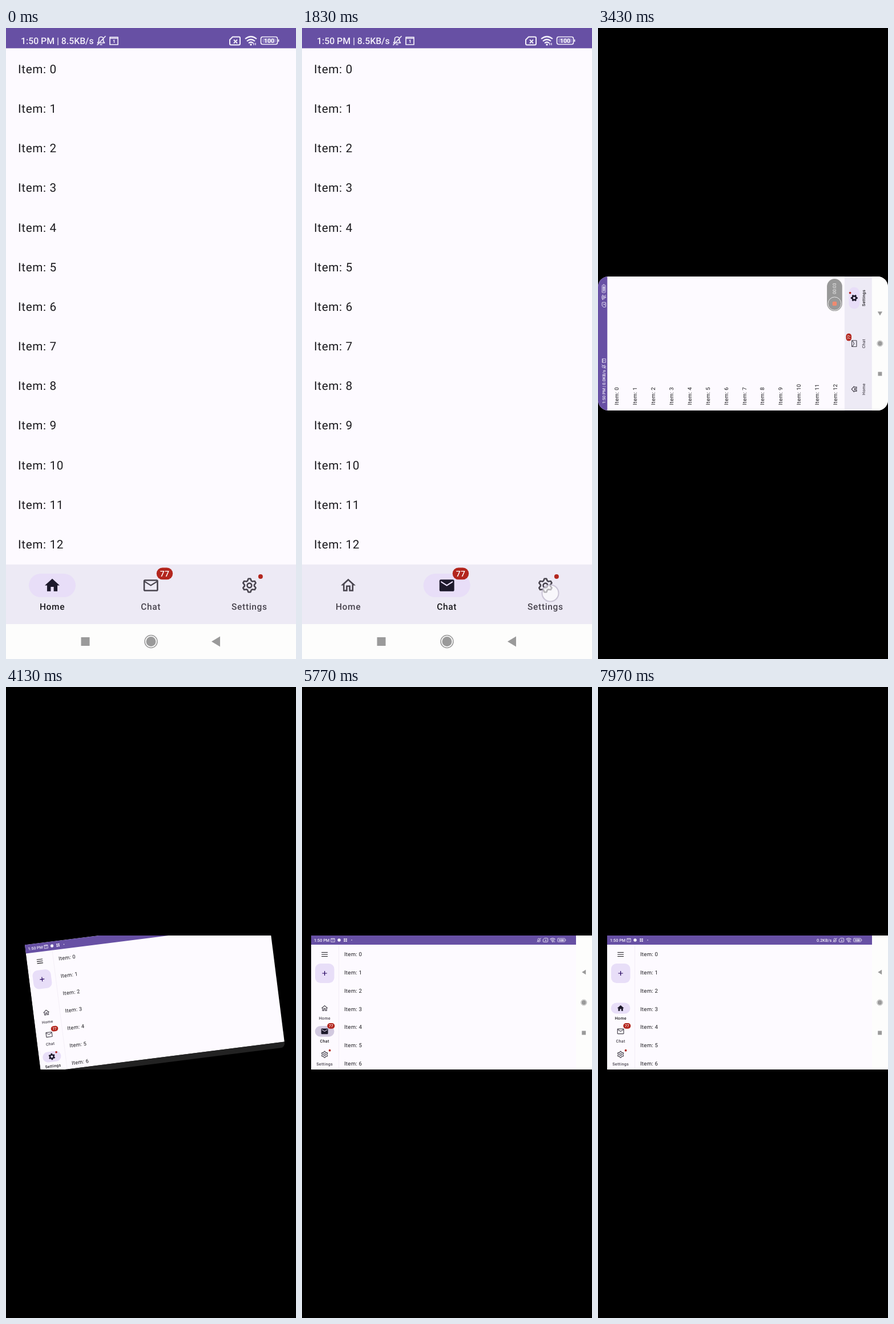
Write an HTML page that moves like this. It is 508 by 1102 pixels and loops after 8000 ms.

```html
<!DOCTYPE html>
<html lang="en">
<head>
<meta charset="utf-8">
<title>Adaptive navigation</title>
<style>
  html, body { margin: 0; width: 100%; height: 100%; overflow: hidden; background: #000; }
  svg { display: block; width: 100vw; height: 100vh; }
  text { font-family: Roboto, sans-serif; text-rendering: geometricPrecision; }
  .item { font-size: 20.7px; letter-spacing: .65px; fill: #1c1b1f; }
  .label { font-size: 15.5px; font-weight: 500; letter-spacing: .65px; text-anchor: middle; }
  .status { font-size: 15.8px; font-weight: 500; fill: #f3effa; }
</style>
</head>
<body>
<svg id="stage" viewBox="0 0 508 1102"></svg>
<script>
const LOOP = 8000, ROTATED = 3370, SPIN = [3800, 4600], K = 0.461;
const PURPLE = '#6750a4', PAPER = '#fdfaff', TINT = '#e8def8', INK = '#1c1b1f', GREY = '#9a9a9a';

// Time of selection, tab, and where the finger touches down
const TAPS = [
  { at: -1000, tab: 0 },
  { at: 1070, tab: 1, touch: [262, 986] },
  { at: 1930, tab: 2, touch: [435, 987] },
  { at: 5600, tab: 1, touch: [41, 602] },
  { at: 6450, tab: 0, touch: [41, 562] }
];

const clamp = v => Math.max(0, Math.min(1, v));
const ramp = (t, from, to) => clamp((t - from) / (to - from));
const place = (x, y, body, s = 1) => `<g transform="translate(${x} ${y}) scale(${s})">${body}</g>`;
const rect = (x, y, w, h, fill, rx = 0, extra = '') =>
  `<rect x="${x}" y="${y}" width="${w}" height="${h}" fill="${fill}" rx="${rx}" ${extra}/>`;
const circle = (x, y, r, attrs) => `<circle cx="${x}" cy="${y}" r="${r}" ${attrs}/>`;
const text = (x, y, cls, body, extra = '') => `<text x="${x}" y="${y}" class="${cls}" ${extra}>${body}</text>`;
const line = (d, width = 1.7, color = '#f3effa') =>
  `<path d="${d}" fill="none" stroke="${color}" stroke-width="${width}" stroke-linejoin="round"/>`;

// Six teeth: tip and root are half angles of the tooth at its outer and inner radius
function gear(outer, inner, tip, root) {
  const points = [];
  for (let tooth = 0; tooth < 6; tooth++)
    for (const [turn, r] of [[-root, inner], [-tip, outer], [tip, outer], [root, inner]]) {
      const a = (tooth * 60 + turn - 90) * Math.PI / 180;
      points.push(`${(12 + r * Math.cos(a)).toFixed(2)} ${(12 + r * Math.sin(a)).toFixed(2)}`);
    }
  return `M${points.join('L')}Z`;
}
const solid = d => `<path fill="#1d192b" fill-rule="evenodd" d="${d}"/>`;
const hollow = d => `<path fill="#49454f" d="${d}"/>`;
const BADGE = rect(10, -31, 28.5, 20.7, '#b3261e', 10.35) +
  text(24.4, -15.6, '', '77', 'fill="#fff" font-size="14" font-weight="500" letter-spacing=".5" text-anchor="middle"');

const TABS = [
  { name: 'Home', extra: '',
    on: solid('M10 20v-6h4v6h5v-8h3L12 3 2 12h3v8z'),
    off: hollow('M12 5.7l5 4.5V18h-2v-6H9v6H7v-7.8l5-4.5M12 3L2 12h3v8h6v-6h2v6h6v-8h3z') },
  { name: 'Chat', extra: BADGE,
    on: solid('M20 4H4a2 2 0 0 0-2 2v12a2 2 0 0 0 2 2h16a2 2 0 0 0 2-2V6a2 2 0 0 0-2-2zm0 4l-8 5-8-5V6l8 5 8-5z'),
    off: hollow('M22 6c0-1.1-.9-2-2-2H4c-1.1 0-2 .9-2 2v12c0 1.1.9 2 2 2h16c1.1 0 2-.9 2-2V6zm-2 0l-8 5-8-5h16zm0 12H4V8l8 5 8-5v10z') },
  { name: 'Settings', extra: circle(19.5, -15.5, 4, 'fill="#b3261e"'),
    on: solid(gear(10.2, 7.5, 11.3, 22.5) + 'M15.5 12a3.5 3.5 0 1 0-7 0a3.5 3.5 0 1 0 7 0Z'),
    off: line(gear(9.2, 6.6, 9, 24), 2, '#49454f') + circle(12, 12, 3, 'fill="none" stroke="#49454f" stroke-width="2"') }
];

const tab = ({ name, on, off, extra }, x, y, width, s) => place(x, y,
  `<g class="tab" data-width="${width}">
    ${rect(0, -20.5, 0, 41, TINT, 20.5, 'class="pill"')}
    ${rect(-width / 2, -20.5, width, 41, INK, 20.5, 'class="ripple"')}
    <g transform="scale(1.295) translate(-12 -12)"><g class="on">${on}</g><g class="off">${off}</g></g>
    ${extra}${text(0, 42.5, 'label', name)}
  </g>`, s);

const items = n => Array.from({ length: n }, (_, i) => text(21, 78.95 + i * 69.17, 'item', `Item: ${i}`)).join('');

const bell = line('M-6 4H6L4 1V-3Q4-6 0-6.5Q-4-6-4-3V1ZM-2 7H2M-7 8L8-8');
const calendar = line('M-7-6H7V7H-7ZM-7-4H7') + line('M-1 0L.5-1V4', 1.3);
const noSim = line('M-4-7H7Q9-7 9-5V5Q9 7 7 7H-7Q-9 7-9 5V-2Z', 2) + line('M-2-2L4 4M4-2L-2 4', 1.8);
const wifi = line('M-10-3Q0-11 10-3M-7 1Q0-5 7 1M-4 4.5Q0 1 4 4.5', 2.2) +
  circle(0, 7, 1.8, 'fill="#f3effa"') + line('M5 4V8M8 4V8', 1.3);
const battery = line('M-13-6.5H11Q14-6.5 14-3V3Q14 6.5 11 6.5H-12Q-15 6.5-15 3V-3Q-15-6.5-12-6.5ZM16-2V2') +
  rect(-12.5, -4, 24, 8, '#8a78be', 2) +
  text(-0.5, 3.8, '', '100', 'font-size="10.5" font-weight="700" fill="#fff" text-anchor="middle"');
const apps = [[-6, -6], [1, -6], [-6, 1], [1, 1]].map(([x, y]) => rect(x, y, 5, 5, '#f3effa')).join('');

const square = rect(-7.5, -7.5, 15, 15, GREY);
const ring = circle(0, 0, 11, `fill="none" stroke="${GREY}" stroke-width="1.5"`) + circle(0, 0, 8.5, `fill="${GREY}"`);
const back = `<path d="M-7 0L8-9V9Z" fill="${GREY}"/>`;

const recorder = `<g id="recorder">
  ${rect(377, 870, 122, 58, '#989898', 29)}
  ${circle(405, 899, 25, 'fill="none" stroke="#eee" stroke-width="2"')}
  ${rect(397, 891, 16, 16, '#f08a70', 4)}
  ${text(462, 905, '', '00:03', 'fill="#f4f4f4" font-size="17" text-anchor="middle"')}</g>`;

const portrait = `<g id="portrait" clip-path="url(#screen)">
  ${rect(0, 0, 508, 1102, PAPER)}${rect(0, 0, 508, 35.4, PURPLE)}
  ${text(26, 28, 'status', '', 'id="speed"')}
  ${place(166.5, 22, bell)}${place(189, 22, calendar)}${place(401, 22.5, noSim)}${place(429, 22, wifi)}${place(461.5, 22, battery)}
  ${items(13)}${rect(0, 937, 508, 104, '#edeaf5')}
  ${TABS.map((t, i) => tab(t, 81 + i * 172.7, 973.5, 82, 1)).join('')}
  ${rect(0, 1041, 508, 61, '#fdfdfc')}
  ${place(139, 1071.5, square)}${place(254, 1071.5, ring)}${place(367, 1071.5, back)}
  ${recorder}</g>`;

const small = (x, y, body) => place(x, y, body, K);
const landscape = `<g clip-path="url(#letterbox)"><g id="landscape">
  <rect id="shade" x="16" y="434" rx="8" fill="#222"/>
  <g clip-path="url(#window)">
    ${rect(16, 434, 492, 234, PAPER)}${rect(16, 434, 464, 16, PURPLE)}${rect(64, 450, 1, 218, '#f3eef6')}
    ${small(21, 444.8, text(0, 0, 'status', '1:50 PM'))}
    ${small(54, 442, calendar)}${small(65, 442, circle(0, 0, 6, 'fill="#f3effa"'))}${small(76, 442, apps)}
    ${circle(87, 442, 0.8, 'fill="#f3effa"')}
    ${small(383, 444.8, text(0, 0, 'status', '0.2KB/s', 'id="rate"'))}
    ${small(415, 442, bell)}${small(426.5, 442, noSim)}${small(439, 442, wifi)}${small(454.5, 442, battery)}
    ${line('M34.2 463.5H45M34.2 467H45M34.2 470.5H45', 1.2, INK)}
    ${rect(23, 483, 33.5, 34, TINT, 9.5)}
    ${line('M35.5 500H43.7M39.6 495.9V504.1', 1.2, '#21005d')}
    ${small(64.3, 433.5, items(7))}
    ${TABS.map((t, i) => tab(t, 39.6, 561 + i * 40.4, 73, K)).join('')}
    ${rect(480, 434, 28, 234, '#fdfdfc')}
    ${small(493.5, 498, back)}${small(493.7, 551, ring)}${small(493.7, 604, square)}
  </g></g></g>`;

const stage = document.getElementById('stage');
stage.innerHTML = `<defs>
    <clipPath id="screen"><rect id="corners" width="508" height="1102"/></clipPath>
    <clipPath id="letterbox"><rect y="434" width="508" height="234"/></clipPath>
    <clipPath id="window"><rect id="frame" x="16" y="434" height="234"/></clipPath>
  </defs><g id="old">${portrait}</g>${landscape}
  <circle id="touch" fill="#fff" fill-opacity=".6" stroke="#b9b2c8" stroke-opacity=".7"/>`;

const $ = id => document.getElementById(id);
const set = (el, attrs) => { for (const k in attrs) el.setAttribute(k, attrs[k]); };
const tabs = [...stage.querySelectorAll('.tab')].map((el, i) => ({
  index: i % 3, width: +el.dataset.width,
  pill: el.querySelector('.pill'), ripple: el.querySelector('.ripple'),
  on: el.querySelector('.on'), off: el.querySelector('.off'), label: el.querySelector('.label')
}));

function drawTabs(t) {
  const now = TAPS.filter(tap => tap.at <= t).pop();
  const before = TAPS[TAPS.indexOf(now) - 1];
  const grow = ramp(t, now.at, now.at + 120);
  for (const { index, width, pill, ripple, on, off, label } of tabs) {
    const selected = index === now.tab;
    const p = selected ? grow : before && before.tab === index ? 1 - grow : 0;
    const w = selected ? width * p : width;
    set(pill, { x: -w / 2, width: w, opacity: p });
    set(ripple, { opacity: selected ? 0.11 * (1 - ramp(t, now.at + 200, now.at + 430)) * grow : 0 });
    set(on, { opacity: selected ? 1 : 0 });
    set(off, { opacity: selected ? 0 : 1 });
    set(label, { fill: selected ? INK : '#49454f' });
  }
}

function drawTouch(t) {
  const tap = TAPS.find(({ at, touch }) => touch && t >= at - 100 && t < at + 20);
  const s = t < ROTATED ? 1 : K;
  set($('touch'), tap
    ? { cx: tap.touch[0], cy: tap.touch[1], r: 14.5 * s, 'stroke-width': 2 * s, opacity: 1 }
    : { opacity: 0 });
}

function drawScreens(t) {
  const turned = t >= ROTATED;
  const q = (1 - ramp(t, ...SPIN)) ** 4.73;
  const fresh = turned ? 1 - ramp(q, 0.3, 0.75) : 0;

  set($('old'), { 'clip-path': turned ? 'url(#letterbox)' : 'none', opacity: 1 - fresh });
  set($('portrait'), { transform: turned
    ? `translate(254 551) rotate(${-90 * q}) scale(${K}) translate(-254 -551)` : '' });
  set($('corners'), { rx: turned ? 40 : 0 });
  set($('recorder'), { opacity: turned ? 1 : 0 });

  // The new window turns about the centre, drifting and widening as it settles
  const a = q * Math.PI / 2, s = 1 - 0.49 * q, drift = q * (1 - q);
  const x = 254 + s * (-238 * Math.cos(a) - 117 * Math.sin(a)) + 269 * drift;
  const y = 551 + s * (238 * Math.sin(a) - 117 * Math.cos(a)) - 242 * drift;
  const width = Math.max(234, 492 - 555 * q);
  set($('landscape'), { opacity: fresh,
    transform: `translate(${x} ${y}) rotate(${-90 * q}) scale(${s}) translate(-16 -434)` });
  set($('frame'), { width });
  set($('shade'), { width, height: 234 + 130 * q, opacity: q > 0.001 ? 1 : 0 });
}

function draw(t) {
  drawTabs(t);
  drawTouch(t);
  drawScreens(t);
  $('speed').textContent = `1:50 PM | ${t < 2640 ? '8.5' : '0.0'}KB/s`;
  set($('rate'), { opacity: t < 7000 ? 0 : 1 });
}

const start = performance.now();
function tick() {
  draw((performance.now() - start) % LOOP);
  requestAnimationFrame(tick);
}
tick();
</script>
</body>
</html>
```
